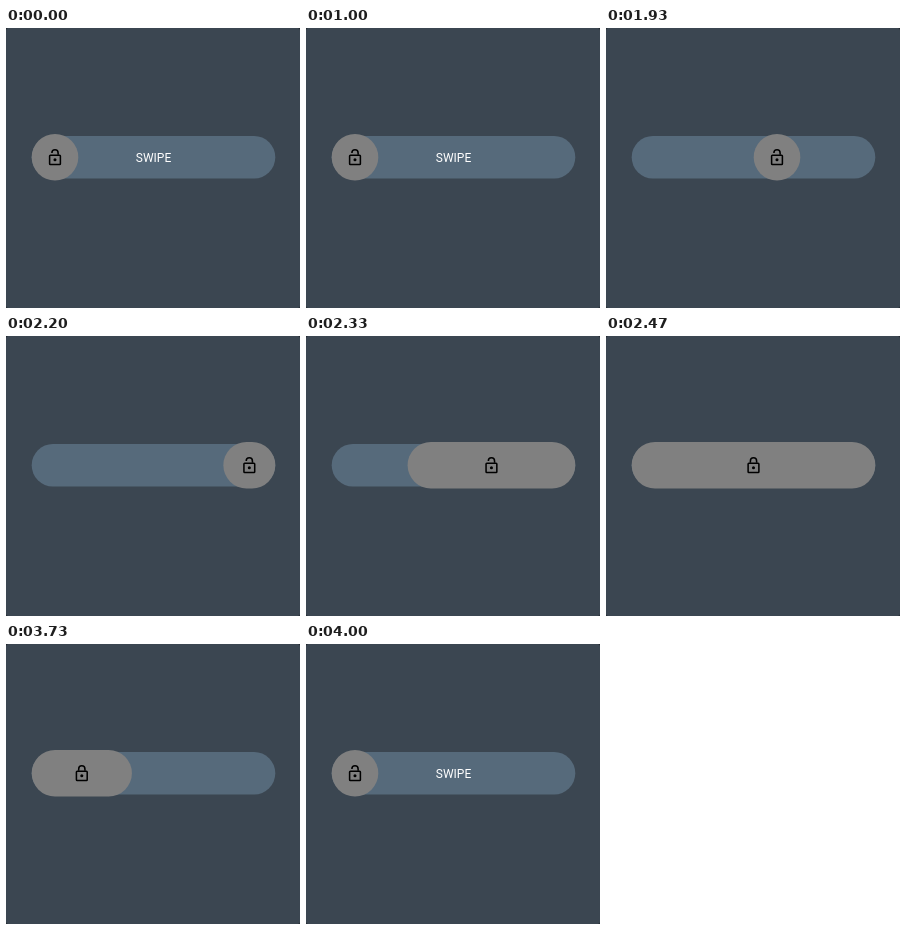
An HTML page with a canvas that plays this animation: 294x280 px, repeating every 4540 ms.

```html
<!DOCTYPE html>
<html lang="en">
<head>
<meta charset="utf-8">
<title>Swipe to lock</title>
<style>
  html, body { margin: 0; width: 100%; height: 100%; overflow: hidden; background: #20262c; }
  canvas { display: block; width: 294px; height: 280px; }
</style>
</head>
<body>
<canvas id="stage"></canvas>
<script>
const W = 294, H = 280, LOOP = 4540, FPS = 15;
const LEFT = 25.7, RIGHT = 269.3, MID = 129.2, KNOB = 46.6;
const TRAVEL = RIGHT - LEFT - KNOB;

const canvas = document.getElementById('stage');
const ctx = canvas.getContext('2d');
const dpr = window.devicePixelRatio || 1;
canvas.width = W * dpr;
canvas.height = H * dpr;

const clamp = v => Math.min(1, Math.max(0, v));
const easeInOut = u => u < 0.5 ? 2 * u * u : 1 - 2 * (1 - u) ** 2;
const progress = (t, start, length) => clamp((t - start) / length);

function roundRect(x, y, w, h, r, color) {
  ctx.beginPath();
  ctx.roundRect(x, y, w, h, r);
  ctx.fillStyle = color;
  ctx.fill();
}

function drawPadlock(cx, locked) {
  ctx.save();
  ctx.translate(cx, MID);
  ctx.scale(0.77, 0.77);
  ctx.translate(-12, -11.6);
  ctx.strokeStyle = ctx.fillStyle = '#000';
  ctx.lineWidth = 2;
  ctx.beginPath();
  ctx.roundRect(5, 9, 14, 12, 1);
  ctx.stroke();
  ctx.beginPath();
  ctx.arc(12, 15, 2, 0, Math.PI * 2);
  ctx.fill();
  ctx.beginPath();
  if (locked) ctx.moveTo(7.95, 8.5);
  ctx.arc(12, 6, 4.05, Math.PI, 0);
  ctx.lineTo(16.05, 8.5);
  ctx.stroke();
  ctx.restore();
}

function stateAt(time) {
  // The motion is sampled on a 15 fps clock.
  const t = Math.floor((time + 5) * FPS / 1000) * 1000 / FPS;
  const u = progress(t, 1667, 467);
  const drag = u + 0.2 * u * (1 - u);
  const grow = easeInOut(progress(t, 2165, 300));
  const shrink = easeInOut(progress(t, 3544, 300));
  const reset = t >= 3999;
  const collapsing = t > 3544;
  return {
    x: LEFT + (collapsing ? 0 : TRAVEL * (drag - grow)),
    w: KNOB + TRAVEL * (collapsing ? 1 - shrink : grow),
    locked: t >= 2465 && !reset,
    label: reset ? 1 : clamp(1 - 2 * drag)
  };
}

function draw(time) {
  const s = stateAt(time);
  ctx.setTransform(dpr, 0, 0, dpr, 0, 0);
  ctx.clearRect(0, 0, W, H);
  roundRect(0, 0, W, H, 2.5, '#3b4651');
  roundRect(LEFT, 108, RIGHT - LEFT, 42.5, 21.25, '#566a7b');

  ctx.globalAlpha = s.label;
  ctx.fillStyle = '#fff';
  ctx.font = '12px Roboto, sans-serif';
  ctx.textAlign = 'center';
  ctx.fillText('SWIPE', 147.5, 133.8);
  ctx.globalAlpha = 1;

  roundRect(s.x, MID - KNOB / 2, s.w, KNOB, KNOB / 2, '#808080');
  drawPadlock(s.x + s.w / 2, s.locked);
}

const origin = performance.now();
function tick() {
  draw((performance.now() - origin) % LOOP);
  requestAnimationFrame(tick);
}
tick();
</script>
</body>
</html>
```
